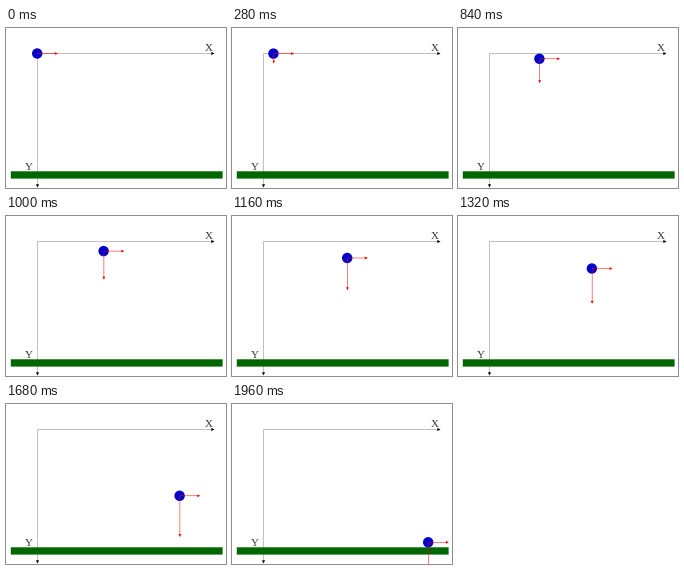
Write a matplotlib script that moves like this. It is 220x160 px and loops after 2 s.

```python
import numpy as np
import matplotlib.pyplot as plt
from matplotlib.animation import FuncAnimation
from matplotlib.patches import Circle, Polygon, Rectangle

W, H, DPI = 220, 160, 100
FRAMES, INTERVAL = 50, 40
PX = 72 / DPI
RED, BLUE, GREEN = "#ff0000", "#0000cc", "#006600"
X0, Y0 = 31.5, 25.5
VX = 20.4

# key poses: frame, ball x, ball y, length of the vertical velocity arrow
KEYS = np.array([
    (0, 31.2, 25.5, 0),
    (13, 55.4, 26.8, 17),
    (21, 81.4, 30.8, 24.5),
    (29, 115.2, 42, 32.3),
    (37, 152.4, 67, 38),
    (42, 173.6, 91.8, 41.3),
    (49, 196.2, 138.3, 45),
])
TIMES, POSES = KEYS[:, 0], KEYS[:, 1:]
SLOPES = np.gradient(POSES, TIMES, axis=0, edge_order=2)
SLOPES[0, 1] = 0


def pose(n):
    """Cubic Hermite interpolation of the key poses."""
    i = min(np.searchsorted(TIMES, n, side="right") - 1, len(TIMES) - 2)
    h = TIMES[i + 1] - TIMES[i]
    s = (n - TIMES[i]) / h
    a, b = POSES[i], POSES[i + 1]
    return ((1 + 2 * s) * (1 - s) ** 2 * a + s * (1 - s) ** 2 * h * SLOPES[i]
            + s * s * (3 - 2 * s) * b + s * s * (s - 1) * h * SLOPES[i + 1])


fig = plt.figure(figsize=(W / DPI, H / DPI), dpi=DPI, facecolor="white")
ax = fig.add_axes([0, 0, 1, 1])
ax.set(xlim=(0, W), ylim=(H, 0))
ax.axis("off")


def head(x, y, dx, dy, size, half):
    """Triangle with its tip at (x, y) pointing along (dx, dy)."""
    bx, by = x - dx * size, y - dy * size
    return [(x, y), (bx - dy * half, by + dx * half),
            (bx + dy * half, by - dx * half)]


class Arrow:
    def __init__(self, dx, dy, color, width, size, half, z):
        self.dir, self.shape = (dx, dy), (size, half)
        self.line, = ax.plot([], [], color=color, lw=width * PX, zorder=z,
                             solid_capstyle="butt", snap=False)
        self.tip = Polygon([(0, 0)] * 3, fc=color, lw=0, zorder=z, snap=False)
        ax.add_patch(self.tip)

    def place(self, x, y, length):
        dx, dy = self.dir
        ex, ey = x + dx * length, y + dy * length
        self.line.set_data([x, ex - dx], [y, ey - dy])
        self.tip.set_xy(head(ex, ey, dx, dy, *self.shape))
        self.tip.set_visible(length > 3)


Arrow(1, 0, "black", 0.24, 3.2, 1.6, 1).place(X0, Y0, 177)
Arrow(0, 1, "black", 0.24, 3.2, 1.6, 1).place(X0, Y0, 134)
ax.add_patch(Rectangle((4.8, 143.3), 211.8, 7.3, fc=GREEN, lw=0, zorder=2,
                       snap=False))
for label, x, y in (("X", 203, 23), ("Y", 23.2, 141.5)):
    ax.text(x, y, label, family="Liberation Serif", size=11 * PX,
            color="#333333", ha="center", va="baseline")

ball = Circle((X0, Y0), 5.2, fc=BLUE, lw=0, zorder=3)
ax.add_patch(ball)
vel_x = Arrow(1, 0, RED, 0.5, 3, 1.4, 4)
vel_y = Arrow(0, 1, RED, 0.5, 3, 1.4, 4)


def update(n):
    x, y, vy = pose(n)
    ball.center = (x, y)
    vel_x.place(x + 0.3, y, VX)
    vel_y.place(x + 0.3, y, vy)
    return ball, vel_x.line, vel_x.tip, vel_y.line, vel_y.tip


anim = FuncAnimation(fig, update, frames=FRAMES, interval=INTERVAL,
                     repeat=True, repeat_delay=0, blit=False)
plt.show()
```
